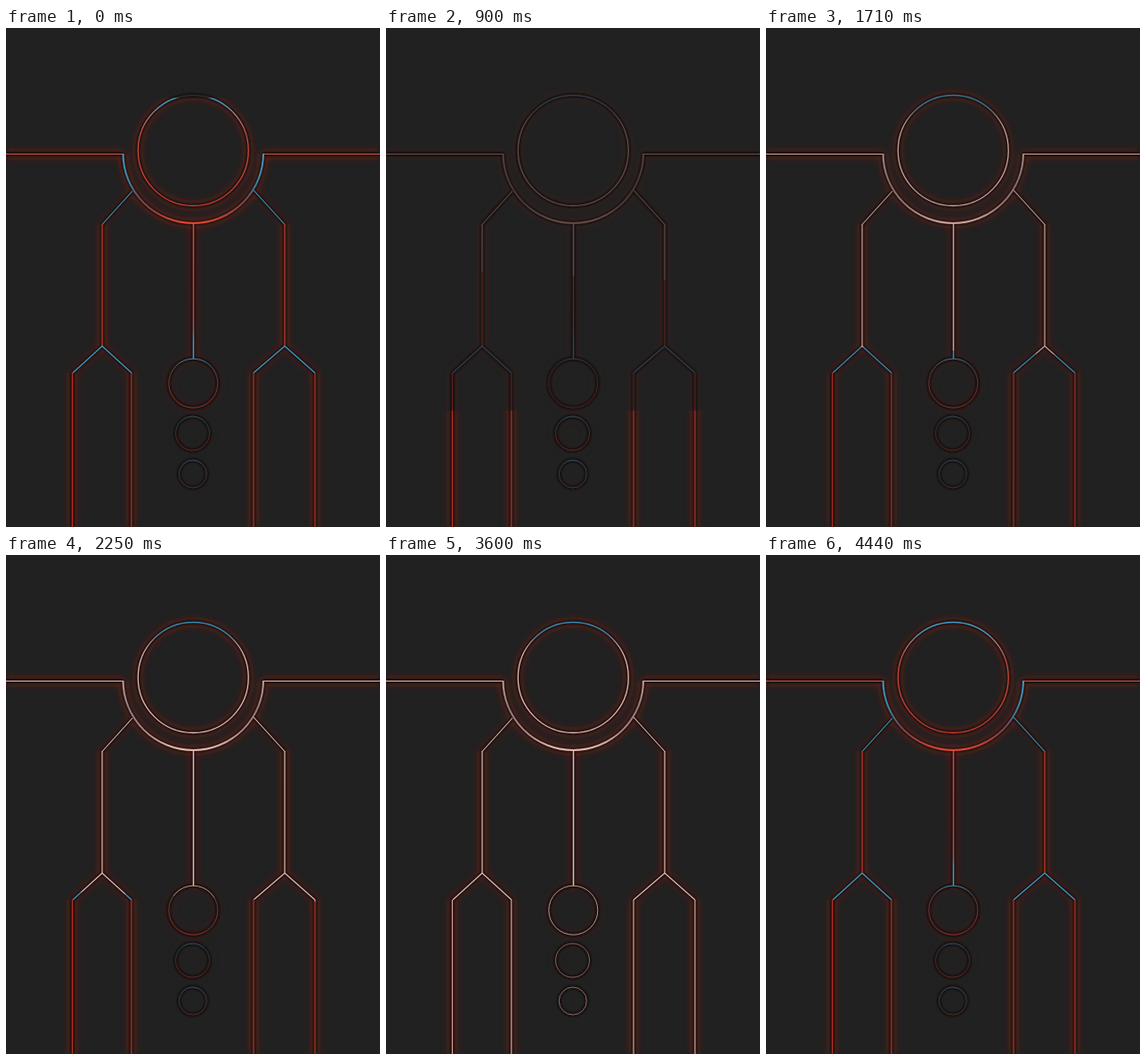
Animation, 420 px wide and 560 px high, one loop 4.47 s. Source, as an HTML page:

```html
<!DOCTYPE html>
<html lang="en">
<head>
<meta charset="utf-8">
<title>Glowing circuit</title>
<style>
  html, body { margin: 0; width: 100%; height: 100%; overflow: hidden; background: #212121; }
  svg { display: block; width: 100vw; height: 100vh; }
</style>
</head>
<body>
<svg id="stage" viewBox="0 0 420 560"></svg>
<script>
const LOOP = 4470;
const BLUE = '#3f9dc5', RED = '#d23a2b', PALE = '#e6b9b1';

const ring = (x, y, r) =>
  `M${x - r} ${y}a${r} ${r} 0 1 1 ${2 * r} 0a${r} ${r} 0 1 1 ${-2 * r} 0`;

// Each part: path, colour while red, colour while pale, width, glow strength.
const parts = [
  { d: 'M0 141.5H131.5M289 141.5H420', red: '#cf5246', pale: PALE, w: 1.1, glow: 0.9 },
  { d: 'M131.5 141A78.75 78 0 0 0 289 141', red: 'url(#arcRed)', pale: 'url(#arcPale)', w: 2, glow: 0.9 },
  { d: ring(210.25, 137.5, 62), red: 'url(#ringRed)', pale: 'url(#ringPale)', w: 1.3, glow: 0.8 },
  { d: 'M142 183L108 220.5M278 182L313 220.5', red: BLUE, pale: PALE, w: 1.1, glow: 0.45 },
  { d: 'M108 220V357M313 220V357', red: '#c63a2d', pale: PALE, w: 1.2, glow: 0.9 },
  { d: 'M75 387L108 357L141 387M278 387L313 357L347 387', red: BLUE, pale: PALE, w: 1.2, glow: 0.6 },
  { d: 'M74.5 387V560M140.8 387V560M278 387V560M347 387V560', red: '#bd3024', pale: '#d9a299', w: 1.2, glow: 0.9 },
  { d: 'M210.5 219V371.5', red: 'url(#stemRed)', pale: PALE, w: 1.5, glow: 0.7 },
  { d: ring(210.3, 398.7, 27.5), red: 'url(#dropRed)', pale: '#c08f88', w: 1, glow: 0.3 },
  { d: ring(209.5, 455, 19), red: 'url(#midRed)', pale: '#936660', w: 0.9, glow: 0.1 },
  { d: ring(209.8, 500.5, 15.5), red: 'url(#lowRed)', pale: '#9a716b', w: 0.9, glow: 0 }
];

const grad = (id, y1, y2, ...stops) =>
  `<linearGradient id="${id}" gradientUnits="userSpaceOnUse" x1="0" x2="0" y1="${y1}" y2="${y2}">` +
  stops.map(([o, c]) => `<stop offset="${o}" stop-color="${c}"/>`).join('') + '</linearGradient>';

const blur = (id, s) =>
  `<filter id="${id}" filterUnits="userSpaceOnUse" x="-20" y="-20" width="460" height="620">` +
  `<feGaussianBlur stdDeviation="${s}"/></filter>`;

const strokes = style => parts.map(p => `<path d="${p.d}" ${style(p)}/>`).join('');

const stage = document.getElementById('stage');
stage.innerHTML = `<defs>
  ${grad('ringRed', 75, 199, [0, BLUE], [0.1, '#4f95b3'], [0.18, '#b98580'], [0.36, '#c94c40'], [1, RED])}
  ${grad('ringPale', 75, 199, [0, '#3488ad'], [0.11, '#44809a'], [0.18, '#b08f8c'], [0.3, PALE], [1, PALE])}
  ${grad('arcRed', 141, 219, [0, BLUE], [0.45, '#397f9c'], [0.65, '#74484d'], [0.9, '#b54236'], [1, '#e04432'])}
  ${grad('arcPale', 141, 219, [0, '#bda29e'], [0.4, '#8f7c7c'], [0.7, '#a98580'], [1, PALE])}
  ${grad('stemRed', 219, 372, [0, '#ec4632'], [0.55, '#d23e2d'], [0.78, '#a45b58'], [0.86, BLUE], [1, BLUE])}
  ${grad('dropRed', 371, 426, [0, '#3d89a8'], [0.18, '#435d68'], [0.4, '#74302b'], [1, '#a02d24'])}
  ${grad('midRed', 436, 474, [0, '#2c5c70'], [0.3, '#283b43'], [0.6, '#57231f'], [1, '#70251f'])}
  ${grad('lowRed', 485, 516, [0, '#34586a'], [0.5, '#433436'], [1, '#582c29'])}
  ${blur('soft', 4.5)}${blur('edge', 0.9)}
  <mask id="level" maskUnits="userSpaceOnUse" x="0" y="0" width="420" height="560">
    <rect width="420" height="560" fill="#fff"/>
    <rect id="shade" width="420" height="0"/>
  </mask>
  <clipPath id="redClip"><path id="redArea"/></clipPath>
  <clipPath id="paleClip"><path id="paleArea"/></clipPath>
</defs>
<rect width="420" height="560" fill="#212121"/>
<g fill="none" stroke-linejoin="round">
  <g mask="url(#level)"><g filter="url(#soft)" stroke="#b8241a" stroke-width="7">
    ${strokes(p => `opacity="${p.glow * 0.5}"`)}</g></g>
  <g filter="url(#edge)" stroke="#0d0909" stroke-width="4" opacity="0.85">${strokes(() => '')}</g>
  <g stroke="#3a1d1b" stroke-width="0.9">${strokes(() => '')}</g>
  <g mask="url(#level)">
    <g clip-path="url(#redClip)">${strokes(p => `stroke="${p.red}" stroke-width="${p.w}"`)}</g>
    <g clip-path="url(#paleClip)">${strokes(p => `stroke="${p.pale}" stroke-width="${p.w}"`)}</g>
  </g>
</g>`;

const [shade, redArea, paleArea] = ['shade', 'redArea', 'paleArea'].map(id => document.getElementById(id));

// Height of the pale edge over time: quick, slow, then quick again.
const edge = [[0, 60], [540, 225], [1230, 327], [1710, 362], [2190, 381],
  [2700, 403], [2880, 410], [3240, 441], [3570, 575], [4470, 600]];

const smooth = (a, b, t) => {
  const u = Math.min(1, Math.max(0, (t - a) / (b - a)));
  return u * u * (3 - 2 * u);
};

function paleEdge(t) {
  let i = 1;
  while (i < edge.length - 1 && t > edge[i][0]) i++;
  const [t0, y0] = edge[i - 1], [t1, y1] = edge[i];
  return y0 + (y1 - y0) * (t - t0) / (t1 - t0);
}

// A band across the stage between two edges, the lower one slightly tilted.
const band = (a, b, tiltA, tiltB) => {
  const at = (y, k, x) => y + k * (x - 210);
  return `M0 ${at(a, tiltA, 0)}L420 ${at(a, tiltA, 420)}L420 ${at(b, tiltB, 420)}L0 ${at(b, tiltB, 0)}Z`;
};

function draw(t) {
  const dark = 78 + 0.39 * t;
  const level = 0.13 + 0.45 * smooth(600, 1300, t) + 0.42 * smooth(1200, 2050, t);
  const back = t < 3690 ? -20 : 138 + 0.72 * (t - 3795);
  const front = Math.max(paleEdge(t), back);
  const tilt = t > 3690 ? 0 : 0.04;

  const tone = Math.round(level * 255);
  shade.setAttribute('height', Math.min(560, dark));
  shade.setAttribute('fill', '#fff');
  shade.setAttribute('fill', `rgb(${tone},${tone},${tone})`);
  // Mask tones are luminance in linear-free sRGB, so the grey maps directly to opacity.
  paleArea.setAttribute('d', band(back, front, 0, tilt));
  redArea.setAttribute('d', band(-40, back, 0, 0) + band(front, 640, tilt, 0));
}

function tick(now) {
  draw(now % LOOP);
  requestAnimationFrame(tick);
}
draw(0);
requestAnimationFrame(tick);
</script>
</body>
</html>
```
